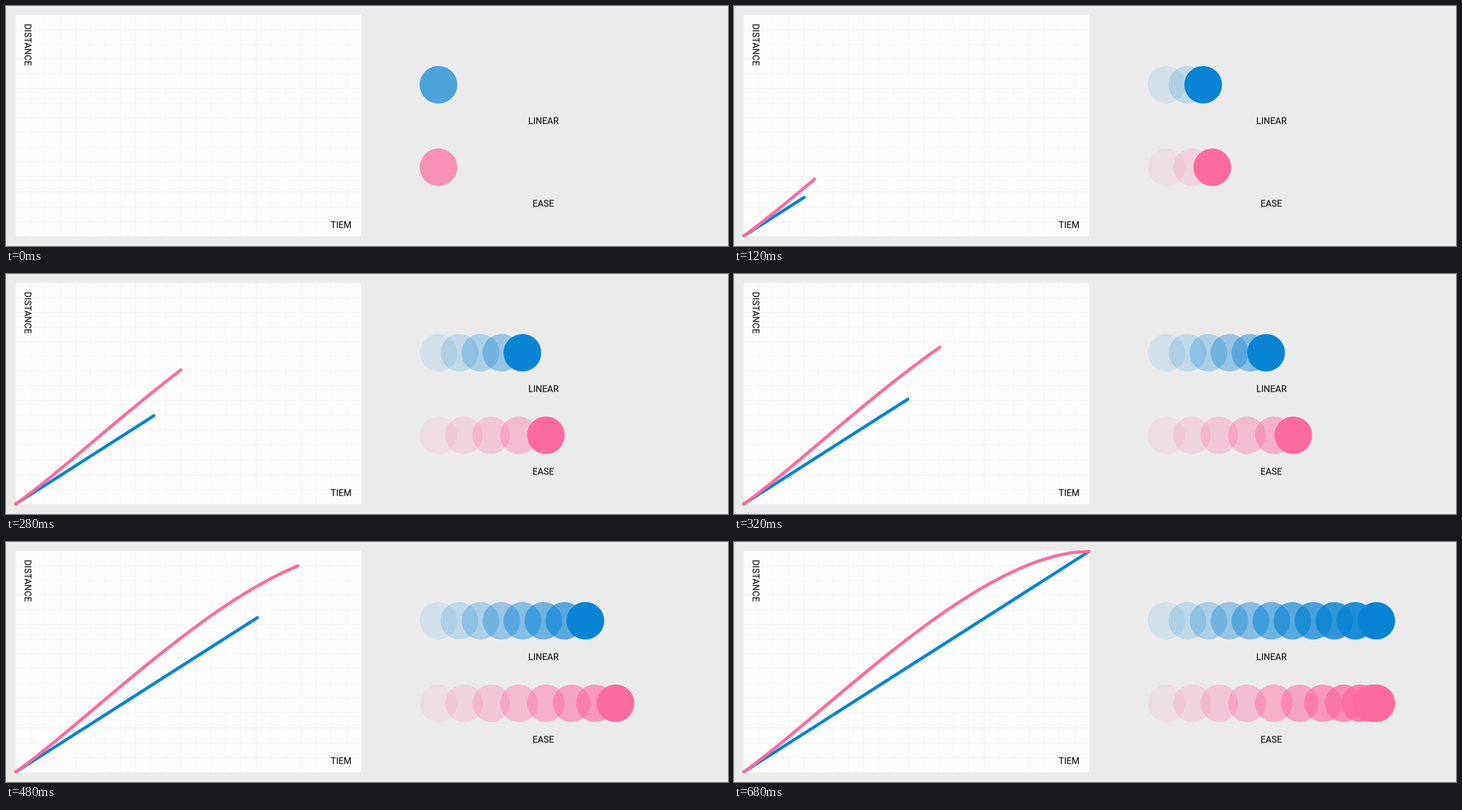
These frames come from a looping animation (1280 px wide and 427 px high, 3 s). An HTML page:

```html
<!DOCTYPE html>
<html lang="en">
<head>
<meta charset="utf-8">
<title>Linear and ease</title>
<style>
  html, body { margin: 0; width: 100%; height: 100%; overflow: hidden; background: #ebebec; }
  svg { display: block; width: 100%; height: 100%; }
  text { font: 16px Roboto, Arial, sans-serif; fill: #000; }
  .curve { fill: none; stroke-width: 5.6; stroke-linecap: round; }
</style>
</head>
<body>
<svg id="stage" viewBox="0 0 1280 427">
  <rect x="17.3" y="16.3" width="612.4" height="393.2" fill="#fcfcfc"/>
  <g id="grid"></g>
  <text transform="translate(33.4 31.6) rotate(90)">DISTANCE</text>
  <text x="575.6" y="394.6">TIEM</text>
  <text x="953" y="210.4" text-anchor="middle">LINEAR</text>
  <text x="952.5" y="357.2" text-anchor="middle">EASE</text>
</svg>
<script>
const LOOP = 3000, TICK = 40, FPS = 60, STEPS = 40, GHOSTS = 10;
const GRAPH = { x: 17.5, y: 409, w: 611.6, h: 392 };
const TRACK = { x: 766.7, w: 372, r: 33.4 };
const EASE = [0.25, 0.28, 0.685, 1];
const ROWS = [42, 68, 94, 120, 146, 172, 198, 224, 250, 277, 303, 330, 357, 383];

const stage = document.getElementById('stage');
const grid = document.getElementById('grid');

function add(parent, tag, attrs) {
  const el = document.createElementNS('http://www.w3.org/2000/svg', tag);
  for (const key in attrs) el.setAttribute(key, attrs[key]);
  parent.appendChild(el);
  return el;
}

const bez = (a, b, s) => 3 * a * s * (1 - s) ** 2 + 3 * b * s * s * (1 - s) + s ** 3;

function ease(p) {
  if (p <= 0 || p >= 1) return p;
  const [x1, y1, x2, y2] = EASE;
  let lo = 0, hi = 1;
  for (let i = 0; i < 30; i++) {
    const mid = (lo + hi) / 2;
    if (bez(x1, x2, mid) < p) lo = mid; else hi = mid;
  }
  return bez(y1, y2, lo);
}

const linear = p => p;
const point = (u, v) => `${GRAPH.x + u * GRAPH.w} ${GRAPH.y - v * GRAPH.h}`;
const trackX = v => TRACK.x + v * TRACK.w;

for (const y of ROWS) {
  add(grid, 'rect', { x: 17.3, y, width: 612.4, height: 1, fill: y > 260 ? '#f2f2f2' : '#f5f5f5' });
}
for (let i = 0; i < 22; i++) {
  const x = Math.floor(43.3 + 26.66 * i);
  add(grid, 'rect', { x, y: 16.3, width: 1, height: 393.2, fill: '#f5f5f5' });
}

function makeRow(color, cy, timing, controls) {
  const [x1, y1, x2, y2] = controls;
  const curve = add(stage, 'path', {
    class: 'curve', stroke: color, pathLength: 1,
    d: `M${point(0, 0)} C${point(x1, y1)} ${point(x2, y2)} ${point(1, 1)}`
  });
  const disc = (v, opacity) => add(stage, 'circle', {
    cx: trackX(v), cy, r: TRACK.r, fill: color, opacity
  });
  const ghosts = [];
  for (let i = 0; i < GHOSTS; i++) ghosts.push(disc(timing(i / GHOSTS), 0.1 + 0.09 * i));
  const ball = disc(0, 1);

  return p => {
    const v = timing(p);
    curve.style.visibility = p > 0 ? 'visible' : 'hidden';
    curve.setAttribute('stroke-dasharray', p < 1 ? `${v} 2` : 'none');
    ghosts.forEach((g, i) => {
      g.style.visibility = p > i / GHOSTS + 1e-6 ? 'visible' : 'hidden';
    });
    ball.setAttribute('cx', trackX(v));
    ball.setAttribute('opacity', Math.min(1, 0.7 + 2 * p));
  };
}

const rows = [
  makeRow('#0984d5', 140.1, linear, [1 / 3, 1 / 3, 2 / 3, 2 / 3]),
  makeRow('#fd6aa0', 286.8, ease, EASE)
];

function draw(time) {
  const tick = Math.floor((time % LOOP) / TICK);
  const step = Math.floor(tick * TICK * FPS / 1000 + 1e-6);
  const p = Math.min(step / STEPS, 1);
  rows.forEach(update => update(p));
}

function loop() {
  draw(performance.now() - start);
  requestAnimationFrame(loop);
}

const start = performance.now();
loop();
</script>
</body>
</html>
```
